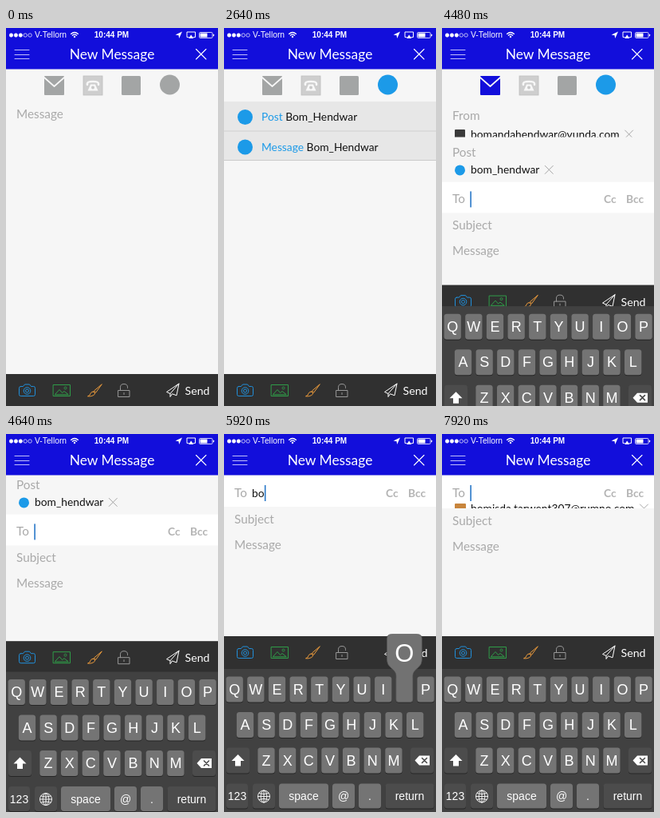
Animation of 266x473 px, one loop 8 s. Source, as an HTML page:

```html
<!DOCTYPE html>
<html lang="en">
<head>
<meta charset="utf-8">
<title>New Message</title>
<style>
  html, body { margin: 0; width: 100%; height: 100%; overflow: hidden; background: #f6f6f6; }
  svg { display: block; }
  #stage { width: 100vw; height: 100vh; }
  text { font-family: Lato, sans-serif; }
  .sys { font-family: "Liberation Sans", Arial, sans-serif; fill: #fff; }
  .label { font-size: 15.3px; fill: #a9a9a9; }
  .item { font-size: 13.8px; fill: #111; }
  .mid { text-anchor: middle; }
  .line { fill: none; stroke-linecap: round; stroke-linejoin: round; }
</style>
</head>
<body>
<svg id="stage" viewBox="0 0 266 473" xmlns="http://www.w3.org/2000/svg"></svg>
<script>
const LOOP = 8000, STEP = 80;
const BLUE = '#120edb', SKY = '#1c9ae8', GRAY = '#a3a5a5';
const FORM_TOP = 92, BLOCK = 56, TO_BAR = 39, SUBJECT = 32, MENU = 74;

const TYPED = 'bomis';
const KEY_TIMES = [5520, 5840, 6080, 6400, 6640];
const KEY_HOLD = 180;
const ADDED = 7840; // the typed name turns into a chip

const text = (x, y, s, cls = '', attrs = '') =>
  `<text x="${x}" y="${y}" class="${cls}" ${attrs}>${s}</text>`;
const box = (x, y, w, h, fill, r = 0) =>
  `<rect x="${x}" y="${y}" width="${w}" height="${h}" rx="${r}" fill="${fill}"/>`;
const dot = (x, y, r, fill, id = '') =>
  `<circle ${id && `id="${id}"`} cx="${x}" cy="${y}" r="${r}" fill="${fill}"/>`;
const line = (d, color, w = 1, extra = '') =>
  `<path class="line" d="${d}" stroke="${color}" stroke-width="${w}" ${extra}/>`;
const group = (id, body) => `<g id="${id}">${body}</g>`;
const clip = (id, y, h, body) =>
  `<svg id="${id}" x="0" y="${y}" width="266" height="${h}" overflow="hidden">${body}</svg>`;

function statusBar() {
  let s = '';
  for (let i = 0; i < 5; i++) {
    s += `<circle cx="${6.5 + i * 5.9}" cy="9" r="2.2" fill="${i < 3 ? '#fff' : 'none'}" stroke="#fff" stroke-width=".7"/>`;
  }
  return s +
    text(36, 12, 'V-Tellorn', 'sys', 'font-size="10.3"') +
    line('M81.500 7.400Q86 3.600 90.500 7.400M83.300 9.200Q86 7 88.700 9.200', '#fff', 1.3) +
    dot(86, 11, 1.2, '#fff') +
    text(132.5, 12, '10:44 PM', 'sys mid', 'font-size="10" font-weight="bold"') +
    '<path d="M221 4.500L217.200 13L216.600 9.200L212.600 8.600Z" fill="#fff"/>' +
    line('M229 11.500H227V5H237.500V11.500H235.500', '#fff', 1) +
    '<path d="M232.200 8.500L235.500 13H229Z" fill="#fff"/>' +
    '<rect x="242.500" y="5.500" width="16.500" height="7" rx="1.200" fill="none" stroke="#fff" stroke-width=".8"/>' +
    box(243.5, 6.5, 9, 5, '#fff') + box(259.8, 7.7, 1.3, 2.6, '#fff', .5);
}

const header = () => box(0, 0, 266, 51.5, BLUE) + statusBar() +
  line('M11 27.500H29M11 33.500H29M11 38.500H29', '#d4d4ff', .9) +
  text(133, 39, 'New Message', 'mid', 'font-size="17.4" fill="#fff"') +
  line('M238.500 26.500L251 39M251 26.500L238.500 39', '#fff', 1.1);

const channels = () =>
  `<rect id="mail" x="48" y="60" width="25" height="24" rx="1"/>` +
  line('M48 62L60.500 73L73 62', '#f7f7f7', 1.7) +
  '<rect x="97" y="60" width="24" height="24" fill="#cecece" stroke="#bfbfbf" stroke-width=".8"/>' +
  line('M102 71V69.500Q102 67 109 67T116 69.500V71', '#f7f7f7', 2.6) +
  '<path d="M106 70.500H112L115.500 78.500H102.500Z" fill="#f7f7f7"/>' + dot(109, 74.5, 2, '#c8c8c8') +
  box(145, 60, 24, 24, GRAY, 1.5) + dot(205.5, 71, 12.5, GRAY, 'social');

const chip = (icon, s) => icon + text(36, 45.5, s, 'item') +
  line('M-5 -5L5 5M5 -5L-5 5', '#a5a5a5', 1, 'data-close="1"');

const form = () => group('form', channels() +
  clip('from', FORM_TOP, BLOCK, text(13, 23, 'From', 'label') +
    chip(box(16, 35, 13, 12, '#3a3a3a', 1), 'bomandahendwar@vunda.com')) +
  clip('post', FORM_TOP, BLOCK, text(13, 24.5, 'Post', 'label') +
    chip(dot(22.5, 41.5, 6.5, SKY), 'bom_hendwar')) +
  clip('to', FORM_TOP, TO_BAR, box(0, 0, 266, 80, '#fff') + text(13, 26.5, 'To', 'label') +
    text(35, 26.5, '', 'item', 'id="typed"') +
    '<rect id="caret" y="12" width="1.600" height="20" fill="#2878c8"/>' +
    text(203, 27, 'Cc', '', 'font-size="13.800" font-weight="700" fill="#b4b4b4"') +
    text(231, 27, 'Bcc', '', 'font-size="13.800" font-weight="700" fill="#b4b4b4"') +
    group('toChip', chip(box(16, 35, 14, 12, '#c8853c', 1), 'bomisda.tarwent307@rumno.com'))) +
  clip('subject', FORM_TOP, SUBJECT, text(13, 20.5, 'Subject', 'label')) +
  text(13, 113, 'Message', 'label', 'id="message"'));

function menu(id, rows) {
  const body = rows.map(([icon, s], i) =>
    `<g transform="translate(0 ${i * 37.5})">${icon}${text(47, 24, s, 'item')}</g>`).join('');
  return clip(id, FORM_TOP, MENU, box(0, 0, 266, MENU, '#e7e7e7') +
    box(0, 36.5, 266, 1, '#d0d0d0') + body + box(0, MENU - 1, 266, 1, '#cacaca'));
}

const verb = s => `<tspan fill="${SKY}">${s}</tspan> Bom_Hendwar`;
const menus = () =>
  menu('socialMenu', ['Post', 'Message'].map(s => [dot(26.5, 19.5, 9.5, SKY), verb(s)])) +
  menu('mailMenu', [
    [box(17.5, 13, 18, 14, '#c08a4a', 1), 'bomanda.hendwar628@rumno.com'],
    [box(18, 12, 17, 17, '#4a459f', 1), 'bomandahendwar@vunda.com']]);

const toolbar = () => group('toolbar', box(0, 0, 266, 230, '#303030') +
  line('M18.500 15.500H21.500L23.500 13H29.500L31.500 15.500H34.500Q36.500 15.500 36.500 17.500V25.500Q36.500 27.500 34.500 27.500H18.500Q16.500 27.500 16.500 25.500V17.500Q16.500 15.500 18.500 15.500', '#2090dc', 1) +
  `<g fill="none" stroke="#2090dc"><circle cx="26.500" cy="21" r="4.300"/><circle cx="26.500" cy="21" r="2"/></g>` +
  line('M59.500 13.500H80.500V27.500H59.500ZM61.500 25.500L67 19.500L70.500 23.500L73 21.500L78 25.500Z', '#2f9c48', 1) +
  '<circle cx="74.500" cy="17.500" r="1.500" fill="none" stroke="#2f9c48" stroke-width=".9"/>' +
  line('M120 13L110.500 21L112.300 23Z', '#ee9c3c', 1) +
  line('M109.500 22Q112.500 23 111.500 25Q108.500 28.500 102.500 27.800Q105.500 27 106 24.500Q107 21.800 109.500 22', '#ee9c3c', 1) +
  line('M141 20.500H155V28.500H141ZM143.500 20.500V16.500Q143.500 12.500 148 12.500T152.500 16.500V17.500M148 23.500V25.500', '#989898', 1) +
  line('M217 12L201.500 22.500L206 24.500L217 12L214 26.800L208.500 24.800L206 28.500V24.500', '#fff', 1) +
  text(224.5, 26, 'Send', '', 'font-size="14.2" fill="#fff"'));

// Letter rows: first key centre and key top
const ROWS = [['QWERTYUIOP', 13.2, 303.5], ['ASDFGHJKL', 26.5, 348], ['ZXCVBNM', 53, 392.5]];
const PITCH = 26.65;
const keyPos = {};

const cap = (x, y, w, h, fill) => box(x, y + 1, w, h, '#262626', 3.5) + box(x, y, w, h, fill, 3.5);

function keyboard() {
  let s = box(0, 294, 266, 180, '#414141');
  for (const [letters, x0, y] of ROWS) {
    [...letters].forEach((c, i) => {
      const x = x0 + i * PITCH;
      keyPos[c] = [x, y];
      s += cap(x - 10.7, y, 21.4, 32, '#747474') + text(x, y + 22.3, c, 'sys mid', 'font-size="18"');
    });
  }
  const wide = (x, w, label, fill) => cap(x, 437.5, w, 31, fill) +
    text(x + w / 2, 458, label, 'sys mid', 'font-size="14"');
  return group('keyboard', s +
    cap(3, 392.5, 29, 32, '#4c4c4c') + cap(234, 392.5, 29, 32, '#4c4c4c') +
    '<path d="M17.500 401L25.500 409H21V415.500H14V409H9.500Z" fill="#fff"/>' +
    '<path d="M239.500 408.500L245 402.500H258V414.500H245Z" fill="#fff"/>' +
    line('M248.500 405.500L254.500 411.500M254.500 405.500L248.500 411.500', '#4c4c4c', 1.6) +
    wide(3, 27, '123', '#4c4c4c') + wide(36, 28, '', '#4c4c4c') + wide(69, 62, 'space', '#747474') +
    wide(136, 28, '@', '#747474') + wide(169, 28, '.', '#747474') + wide(202.5, 61, 'return', '#4c4c4c') +
    line('M42.500 453.500H57.500M50 446V461M44 449.500Q50 452 56 449.500M44 457.500Q50 455 56 457.500', '#fff', .9) +
    '<g fill="none" stroke="#fff" stroke-width=".9"><circle cx="50" cy="453.500" r="7.500"/><ellipse cx="50" cy="453.500" rx="3.800" ry="7.500"/></g>');
}

const popup = () => group('popup',
  '<path fill="#727272" stroke="#505050" stroke-width=".6" d="M-22 6q0-6 6-6h32q6 0 6 6v26q0 6-5 10q-6.500 5-6.500 10v30q0 3-3 3h-15q-3 0-3-3v-30q0-5-6.500-10q-5-4-5-10z"/>' +
  text(0, 34, '', 'sys mid', 'id="popLetter" font-size="31"'));

const $ = id => document.getElementById(id);
$('stage').innerHTML = box(0, 0, 266, 473, '#f6f6f6') + form() + menus() + header() +
  toolbar() + keyboard() + popup();

document.querySelectorAll('[data-close]').forEach(x => {
  const width = x.previousElementSibling.getComputedTextLength();
  x.setAttribute('transform', `translate(${36 + width + 12} 41)`);
});

const set = (id, attrs) => {
  for (const k in attrs) $(id).setAttribute(k, attrs[k]);
};
const shift = (id, x, y) => set(id, { transform: `translate(${x} ${y})` });
const show = (id, on) => set(id, { visibility: on ? 'visible' : 'hidden' });

// Ease-out progress from 0 to 1
const ease = (t, start, span) => {
  const u = Math.min(1, Math.max(0, (t - start) / span));
  return 1 - (1 - u) ** 3;
};

function draw(t) {
  set('social', { fill: t < 1760 ? GRAY : SKY });
  set('mail', { fill: t < 2960 ? GRAY : BLUE });
  set('socialMenu', { height: MENU * (ease(t, 1760, 400) - ease(t, 2700, 320)) });
  set('mailMenu', { height: MENU * (ease(t, 2960, 320) - ease(t, 3800, 320)) });

  // Stack the form rows, each with its current height
  const fields = ease(t, 3920, 400);
  const rows = {
    from: BLOCK * ease(t, 4284, 480),
    post: BLOCK * ease(t, 2700, 320),
    to: TO_BAR * fields + 24 * ease(t, 7908, 400),
    subject: SUBJECT * fields
  };
  let y = FORM_TOP;
  for (const id in rows) {
    set(id, { y, height: rows[id] });
    y += rows[id];
  }
  set('message', { y: y + 21 });
  shift('form', 0, -2 * (BLOCK + 20) * ease(t, 4540, 320));

  const count = t < ADDED ? KEY_TIMES.filter(k => t >= k).length : 0;
  $('typed').textContent = TYPED.slice(0, count);
  set('caret', { x: 35.3 + (count ? $('typed').getComputedTextLength() : 0) });
  show('caret', t >= 4320);
  show('toChip', t >= ADDED);

  shift('toolbar', 0, 433 - 180 * ease(t, 4370, 400));
  shift('keyboard', 0, 180 * (1 - ease(t, 4348, 400)));

  const hit = KEY_TIMES.findIndex(k => t >= k && t < k + KEY_HOLD);
  show('popup', hit >= 0);
  if (hit >= 0) {
    const c = TYPED[hit].toUpperCase(), [kx, ky] = keyPos[c];
    shift('popup', kx, ky - 53);
    $('popLetter').textContent = c;
  }
}

const start = performance.now();
function tick() {
  const t = (performance.now() - start) % LOOP;
  draw(Math.floor(t / STEP) * STEP);
  requestAnimationFrame(tick);
}
tick();
</script>
</body>
</html>
```
